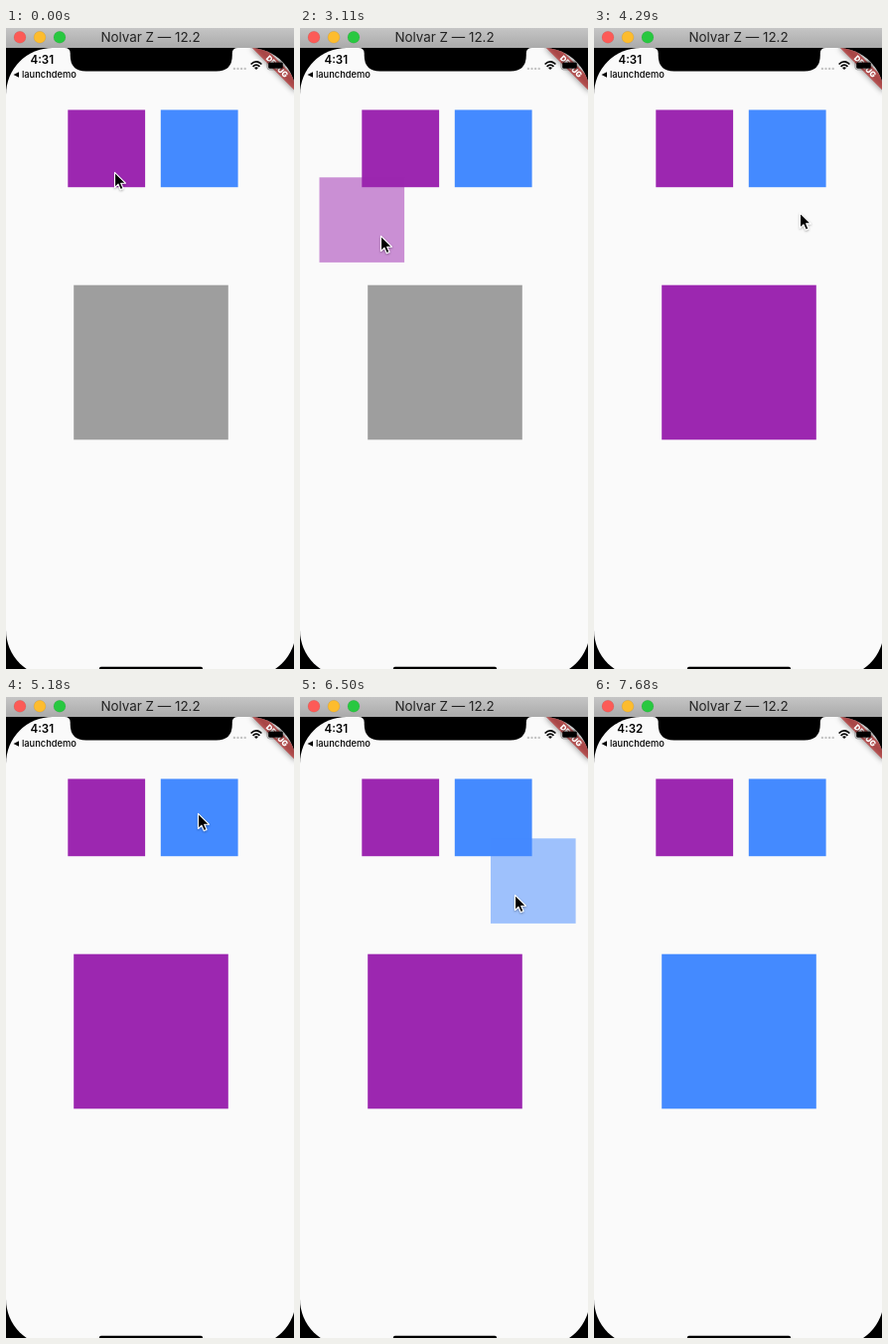
Animation of 290 by 645 pixels, one loop 8000 ms. Source, as an HTML page:

```html
<!DOCTYPE html>
<html lang="en">
<head>
<meta charset="utf-8">
<title>Drag and drop demo</title>
<style>
  html, body { margin: 0; width: 100%; height: 100%; overflow: hidden; background: #000; }
  svg { display: block; width: 290px; height: 645px; font-family: Inter, "Open Sans", sans-serif; }
</style>
</head>
<body>
<svg viewBox="0 0 290 645">
  <defs>
    <linearGradient id="bar" x2="0" y2="1">
      <stop stop-color="#c5c5c5"/>
      <stop offset="1" stop-color="#aaa"/>
    </linearGradient>
    <clipPath id="screen"><rect y="20" width="291.8" height="633" rx="47"/></clipPath>
    <filter id="soft" x="-50%" y="-200%" width="200%" height="500%"><feGaussianBlur stdDeviation="4"/></filter>
    <filter id="shade" x="-50%" y="-50%" width="200%" height="200%">
      <feDropShadow dx="0" dy="1" stdDeviation=".8" flood-opacity=".35"/>
    </filter>
  </defs>

  <rect width="290" height="645"/>

  <!-- window title bar -->
  <rect width="290" height="20" fill="url(#bar)"/>
  <g stroke-opacity=".12" stroke="#000" stroke-width=".6">
    <circle cx="14" cy="9.3" r="6" fill="#fc5b57"/>
    <circle cx="34" cy="9.3" r="6" fill="#fdbc2e"/>
    <circle cx="54" cy="9.3" r="6" fill="#28c840"/>
  </g>
  <text x="145.5" y="14.3" font-size="13.4" text-anchor="middle" fill="#222">Nolvar Z — 12.2</text>

  <g clip-path="url(#screen)">
    <rect y="20" width="292" height="634" fill="#fafafa"/>
    <rect x="62.3" y="82.4" width="77.8" height="77.8" fill="#9c27b0"/>
    <rect x="155.8" y="82.4" width="77.8" height="77.8" fill="#448aff"/>
    <rect id="target" x="68.2" y="258.7" width="155.6" height="155.6"/>
    <rect id="ghost" width="85.6" height="85.6" opacity=".5"/>

    <!-- corner banner -->
    <g transform="translate(291.8 20) rotate(45) scale(.778)">
      <rect x="-40" y="28" width="80" height="12" opacity=".5" filter="url(#soft)"/>
      <rect x="-40" y="28" width="80" height="12" fill="#b71c1c" fill-opacity=".627"/>
      <text y="37.7" font-size="10.2" font-weight="900" text-anchor="middle" fill="#fff">DEBUG</text>
    </g>

    <path d="M59 20Q64.7 20 64.7 25.5V27.4Q64.7 43.4 80.7 43.4H211.8Q227.8 43.4 227.8 27.4V25.5Q227.8 20 233.5 20Z"/>
    <rect x="93.8" y="642.7" width="104.3" height="4" rx="2"/>
  </g>

  <!-- status bar -->
  <text id="clock" x="36.3" y="36.3" font-size="11.6" font-weight="600" text-anchor="middle"></text>
  <path d="M7.5 47 13 44.2V49.8Z"/>
  <text x="16" y="50" font-size="9.3" font-weight="500">launchdemo</text>
  <path d="M229.9 40.9H243" stroke="#c4c4c4" stroke-width="2.4" stroke-linecap="round" stroke-dasharray="0 3.6"/>
  <g fill="none" stroke="#000" stroke-width="1.7">
    <path d="M246.6 36.5Q252 31.3 257.4 36.5M248.6 38.8Q252 35.6 255.4 38.8"/>
    <path d="M252 42 250 39.9Q252 38.4 254 39.9Z" fill="#000" stroke="none"/>
  </g>
  <rect x="263" y="33.3" width="17" height="8.6" rx="2.3" fill="none" stroke="#000" stroke-opacity=".4" stroke-width=".8"/>
  <rect x="264.2" y="34.5" width="14.6" height="6.2" rx="1.3"/>
  <path d="M281.4 36.1Q283 37.6 281.4 39.1Z" opacity=".5"/>

  <path id="cursor" d="M.5 1.4V16.5L4 13.2 6.3 18.6 9 17.4 6.7 12.2H11.4Z"
        stroke="#fff" stroke-width="1.1" stroke-linejoin="round" filter="url(#shade)"/>
</svg>

<script>
const LOOP = 8000, TICK = 147.5, TICK_OFFSET = 10;
const PURPLE = '#9c27b0', BLUE = '#448aff', GREY = '#9e9e9e';
const PURPLE_DROP = 29, BLUE_DROP = 50, POINTER_GONE = 52;

// a Bézier stroke between two ticks that slows towards its end
const stroke = (start, end, ...points) => ({ start, end, points });

const pointer = [
  stroke(7, 10, [109, 144], [119, 104], [112, 144]),
  stroke(12, 14, [112, 144], [112, 156]),
  stroke(14, 21, [112, 156], [90, 180], [20, 270], [81, 208]),
  stroke(21, 28, [81, 208], [115, 239], [152, 336]),
  stroke(28, 35, [152, 336], [305, -70], [193, 116]),
  stroke(36, 44, [193, 116], [300, 150], [216, 198]),
  stroke(44, 52, [216, 198], [170, 260], [168, 336])
];
const drags = [
  stroke(14, 21, [59.4, 91.4], [30, 120], [-40, 210], [19.5, 150.3]),
  stroke(21, 28, [19.5, 150.3], [31, 178], [94, 275]),
  stroke(38, 44, [164, 82.4], [226, 105], [192, 142.3]),
  stroke(44, 49, [192, 142.3], [150, 200], [138, 290])
];

const byId = id => document.getElementById(id);
const target = byId('target'), ghost = byId('ghost'), clock = byId('clock'), cursor = byId('cursor');

const mix = (a, b, k) => a.map((v, i) => v + (b[i] - v) * k);

function bezier(points, k) {
  if (points.length === 1) return points[0];
  return bezier(points.slice(1).map((p, i) => mix(points[i], p, k)), k);
}

function pointOn({ start, end, points }, tick) {
  const k = Math.min(1, Math.max(0, (tick - start) / (end - start)));
  return bezier(points, Math.sin(k * Math.PI / 2));
}

function place(node, path, tick) {
  node.style.display = path ? '' : 'none';
  if (path) node.setAttribute('transform', `translate(${pointOn(path, tick)})`);
}

function draw() {
  const time = performance.now() % LOOP;
  const tick = Math.max(0, Math.floor((time - TICK_OFFSET) / TICK));
  const move = pointer.findLast(s => tick >= s.start) || pointer[0];
  place(cursor, tick < POINTER_GONE && move, tick);
  place(ghost, drags.find(s => tick >= s.start && tick <= s.end), tick);
  ghost.setAttribute('fill', tick < PURPLE_DROP ? PURPLE : BLUE);
  target.setAttribute('fill', tick < PURPLE_DROP ? GREY : tick < BLUE_DROP ? PURPLE : BLUE);
  clock.textContent = tick < BLUE_DROP ? '4:31' : '4:32';
  requestAnimationFrame(draw);
}
draw();
</script>
</body>
</html>
```
